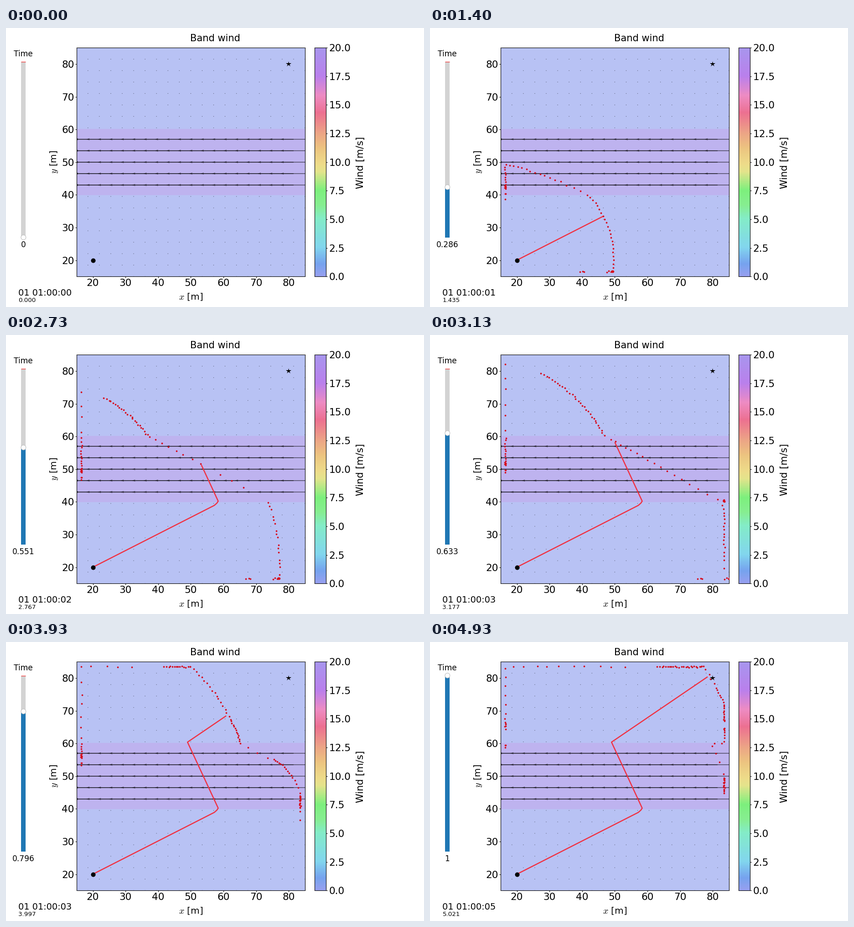
A matplotlib script for the animation above (5.06 s loop, 917 px wide and 611 px high).

```python
import numpy as np
import matplotlib.pyplot as plt
from matplotlib.animation import FuncAnimation
from matplotlib.colors import LinearSegmentedColormap
from matplotlib.patches import Circle, Rectangle

WIDTH, HEIGHT, DPI = 917, 611, 100
LOOP_MS, TICK_MS = 5060, 20
LAST_STEP, TRAVEL_TIME = 49, 5.0214
SUBSTEPS = 10

SPEED, WIND = 20.7, 20.0
START = 20
LOW, HIGH = 16.5, 83.5  # walls that the front slides along

plt.rcParams.update({
    "font.family": "DejaVu Sans",
    "mathtext.fontset": "cm",
    "axes.linewidth": 0.8,
})


def pt(pixels):
    return pixels * 72 / DPI


# ---- wavefront -----------------------------------------------------------

def make_rays():
    """Rows: x, y, cosine in the band, cosine outside, vertical sign, birth."""
    groups = []

    def add(*columns):
        groups.append(np.array(np.broadcast_arrays(*columns), dtype=float))

    # first, last, step in degrees, and the moment the rays join the front
    headings = [
        (-58.5, -17, 13.5, 0), (-13.5, 104, 4.5, 0), (108, 150, 13.5, 0),
        (-11.25, 104, 4.5, 1.25), (28.125, 63, 2.25, 1.45),
        (1.125, 27, 4.5, 2.6), (3.375, 27, 4.5, 2.9),
        (18.5625, 27, 1.125, 3.0),
    ]
    ratio = WIND / SPEED
    for first, last, step, birth in headings:
        angle = np.radians(np.arange(first, last, step))
        calm = np.cos(angle)
        band = np.clip(calm / (1 + ratio * calm), -1, 1)
        add(START, START, band, calm, np.sign(np.sin(angle)), birth)

    # fan of rays leaving the right wall at the lower edge of the band
    band = np.linspace(0.5, 0.96, 16)
    add(HIGH - 0.01, 40.01, band, np.minimum(1, band / (1 - ratio * band)), 1, 3.15)

    # stragglers along the left and the bottom wall
    add(LOW, np.array([19.5, 21.1, 21.3]), 0, 0, 1, 0.5)
    add(np.array([20, 21, 21.3]), LOW, 0, 0, 1, 0.5)
    return np.hstack(groups)


def trace_front():
    x, y, c_band, c_calm, sign, birth = make_rays()
    # rays from the start point travel unseen until birth; others wait
    release = np.where((x == START) & (y == START), 0, birth)
    jitter = np.random.default_rng(4).normal(0, 0.1, (2, x.size))
    dt = TRAVEL_TIME / LAST_STEP / SUBSTEPS
    fronts = []
    for i in range(LAST_STEP * SUBSTEPS + 1):
        t = i * dt
        if i % SUBSTEPS == 0:
            shown = (birth <= t) & (i > 0)
            fronts.append((np.array([x, y]) + jitter)[:, shown])
        band = np.abs(y - 50) < 10
        c = np.where(band, c_band, c_calm)
        vx = SPEED * c - WIND * band
        vy = sign * SPEED * np.sqrt(np.maximum(0, 1 - c * c))
        side = (x <= LOW) | (x >= HIGH)
        level = (y <= LOW) | (y >= HIGH)
        climb = np.where(band, np.sqrt(SPEED**2 - WIND**2), SPEED)
        vx = np.where(level, SPEED, np.where(side, 0, vx))
        vy = np.where(level, 0, np.where(side, climb, vy))
        moving = t >= release
        x = x + vx * dt * moving
        y = np.clip(y + vy * dt * moving, LOW, HIGH)
        x = np.where(y <= LOW, np.maximum(x, LOW), np.clip(x, LOW, HIGH))
    return fronts


# ---- route ---------------------------------------------------------------

ROUTE_T = np.array([0, 2.03, 2.08, 2.122, 3.314, TRAVEL_TIME])
ROUTE_X = np.array([20, 57.2, 58.0, 58.4, 49.0, 78.3])
ROUTE_Y = np.array([20, 38.9, 39.6, 40.2, 60.4, 80.3])


def route_until(t):
    times = np.append(ROUTE_T[ROUTE_T < t], t)
    return np.interp(times, ROUTE_T, ROUTE_X), np.interp(times, ROUTE_T, ROUTE_Y)


# ---- static picture ------------------------------------------------------

fig = plt.figure(figsize=(WIDTH / DPI, HEIGHT / DPI), dpi=DPI, facecolor="white")


def pixel_axes(left, top, right, bottom):
    return fig.add_axes([left / WIDTH, 1 - bottom / HEIGHT,
                         (right - left) / WIDTH, (bottom - top) / HEIGHT])


field = pixel_axes(154.7, 43.2, 656, 544.3)
field.set(xlim=(15, 85), ylim=(15, 85), facecolor="#b8c2f4",
          xticks=range(20, 81, 10), yticks=range(20, 81, 10))
field.tick_params(length=pt(3), width=0.8, pad=pt(1.9), labelsize=pt(21.6))
field.axhspan(39.85, 60.15, color="#beb3ef", lw=0, zorder=0.5)

grid_x, grid_y = np.meshgrid(15 + 3.5 * np.arange(21), 15 + 3.5 * np.arange(21))
reach = np.where(np.abs(grid_y - 50) < 10, -7.5, 0)
field.quiver(grid_x, grid_y, reach, 0 * reach, units="xy", angles="xy",
             scale_units="xy", scale=1, width=0.2, color="black", alpha=0.62,
             zorder=1.5)

route, = field.plot([], [], color="#f03243", lw=pt(2.5), zorder=3)
front, = field.plot([], [], "o", color="#d60a1c", ms=pt(3.7), mew=0, zorder=4)
field.plot(START, START, "o", color="black", ms=pt(10), mew=0, zorder=5)
field.plot(80, 80, "*", color="black", ms=pt(12.2), mew=0, zorder=5)

bar_colors = [
    (0, "#96a0f0"), (1.05, "#76a3ee"), (2.5, "#82d6ee"), (5, "#84ecc8"),
    (6.2, "#87ee91"), (7.5, "#7df07d"), (9.1, "#e3e48c"), (9.8, "#eedc8a"),
    (11.2, "#ecc480"), (12.7, "#eca087"), (14.3, "#ec7091"),
    (15.8, "#ee8cc3"), (17.5, "#ba80ec"), (20, "#a896ee"),
]
bar_map = LinearSegmentedColormap.from_list(
    "wind", [(level / 20, color) for level, color in bar_colors])
bar = pixel_axes(676.5, 43.2, 702, 544.3)
bar.imshow(np.linspace(0, 1, 256)[:, None], cmap=bar_map, origin="lower",
           extent=(0, 1, 0, 20), aspect="auto")
bar.yaxis.tick_right()
bar.set(xticks=[], yticks=np.arange(0, 20.1, 2.5))
bar.yaxis.set_major_formatter("{x:.1f}")
bar.tick_params(length=pt(3), width=0.8, pad=pt(3.2), labelsize=pt(21.6))

panel = pixel_axes(0, 0, WIDTH, HEIGHT)
panel.set(xlim=(0, WIDTH), ylim=(HEIGHT, 0))
panel.axis("off")


def label(x, y, text, size, ha="center", va="baseline", **kwargs):
    return panel.text(x, y, text, fontsize=pt(size), ha=ha, va=va, **kwargs)


label(458.5, 29, "Band wind", 21)
label(405.5, 594.5, "$x$ [m]", 20)
label(105.5, 293.5, "$y$ [m]", 20, va="center", rotation=90)
label(778, 294.5, "Wind [m/s]", 21, va="center", rotation=90)
label(38, 62, "Time", 17)

# ---- slider and clock ----------------------------------------------------

TRACK_TOP, TRACK_BOTTOM = 73.5, 458.5
panel.add_patch(Rectangle((33, TRACK_TOP), 10, TRACK_BOTTOM - TRACK_TOP,
                          color="lightgrey", lw=0))
fill = panel.add_patch(Rectangle((33, TRACK_BOTTOM), 10, 0, color="#1f77b4", lw=0))
panel.plot([33, 43], [TRACK_TOP] * 2, color="#f04040", lw=pt(1.4),
           solid_capstyle="butt")
knob = panel.add_patch(Circle((38.3, TRACK_BOTTOM), 5.4, fc="white", ec="0.75",
                              lw=pt(1.1), zorder=4))
slider_value = label(38, 479.5, "", 17)
clock = label(27, 586, "", 19.4, ha="left")
seconds = label(27.5, 600, "", 13.4, ha="left")


def short_number(value):
    digits = next(d for d in range(4) if abs(value - round(value, d)) < 1e-3)
    return f"{value:.{digits}f}"


# ---- animation -----------------------------------------------------------

FRONTS = trace_front()


def update(tick):
    # steps alternate between 130 and 70 ms
    ms = tick * TICK_MS + TICK_MS // 2
    step = min(LAST_STEP, 2 * (ms // 200) + (ms % 200 >= 130))
    share = step / LAST_STEP
    t = share * TRAVEL_TIME

    route.set_data(*route_until(t))
    front.set_data(*FRONTS[step])

    level = TRACK_BOTTOM + share * (TRACK_TOP - TRACK_BOTTOM)
    fill.set_height(level - TRACK_BOTTOM)
    knob.center = (38.3, level)
    slider_value.set_text(short_number(share))
    clock.set_text(f"01 01:00:{int(t):02d}")
    seconds.set_text(f"{t:.3f}")
    return route, front, fill, knob, slider_value, clock, seconds


animation = FuncAnimation(fig, update, frames=LOOP_MS // TICK_MS,
                          interval=TICK_MS, repeat=True, repeat_delay=0)
plt.show()
```
